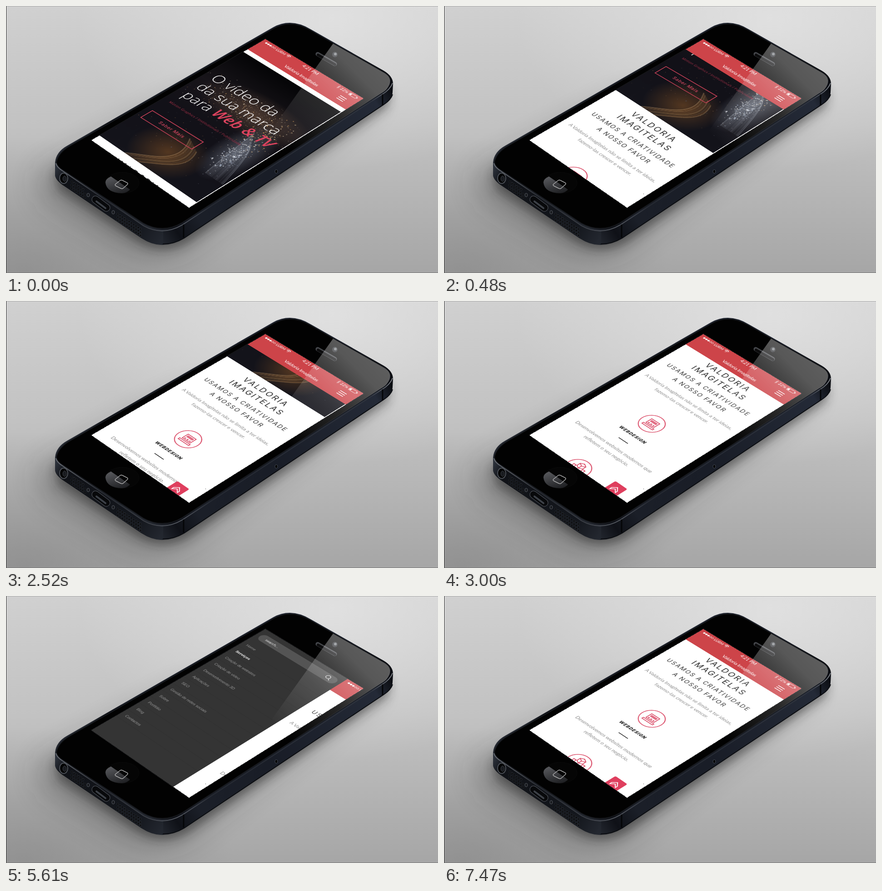
Animation of 951x589 px, one loop 9 s. Source, as an HTML page with a canvas:

```html
<!DOCTYPE html>
<html lang="pt">
<head>
<meta charset="utf-8">
<title>Mobile site mockup</title>
<style>
html, body { margin: 0; width: 100%; height: 100%; overflow: hidden; }
#stage { position: relative; width: 951px; height: 589px; overflow: hidden;
  background:
    radial-gradient(ellipse 560px 330px at 720px 30px, #e4e4e4cc, #e4e4e400),
    radial-gradient(ellipse 460px 300px at 40px 589px, #83838399, #83838300),
    linear-gradient(#d0d0d0, #c2c2c2 45%, #a6a6a6); }
#stage::after { content: ""; position: absolute; inset: 0; border-left: 1px solid #333; border-top: 1px solid #aaa; border-bottom: 1px solid #777; }
svg { position: absolute; left: 0; top: 0; }
#screen { position: absolute; left: 0; top: 0; width: 320px; height: 568px; overflow: hidden; transform-origin: 0 0; background: #343434; }
#screen * { position: absolute; white-space: nowrap; }
#screen b, #screen i { position: static; }
.row, .mid { line-height: 0; }
.mid { left: 0; width: 320px; text-align: center; }
#front, #page { left: 0; top: 0; width: 320px; height: 568px; background: #fff; }
#front { overflow: hidden; }
#page { height: 1120px; }
#hero { left: 0; top: 76px; width: 318px; height: 467px; }
#pitch { left: 0; top: 0; width: 320px; height: 0; transform-origin: 18px 0; transform: skewY(-2deg); }
.big { left: 21px; color: #fff; font: 300 42px/0 "Open Sans", sans-serif; }
.big b { color: #e0435f; font-weight: 600; }
#tags { left: 19px; top: 339px; color: #ab3148; font: 10px/0 "Open Sans", sans-serif; letter-spacing: .35px; }
#more { left: 15px; top: 391px; width: 161px; height: 35px; border: 2px solid #d0425a; color: #d94862; text-align: center; font: 500 13px/35px Inter, sans-serif; letter-spacing: 1px; }
.title { color: #2b2b2b; font: 400 23px/0 Inter, sans-serif; letter-spacing: 3.3px; }
.sub { color: #333; font: 400 17px/0 Inter, sans-serif; letter-spacing: 2.6px; }
.copy { color: #8c8c8c; font: 400 14px/0 Lato, sans-serif; }
.name { color: #222; font: italic 800 12px/0 Inter, sans-serif; letter-spacing: 1.2px; }
#rule { left: 145px; top: 918px; width: 30px; height: 2px; background: #333; }
#bar { left: 0; top: 0; width: 320px; height: 61px; background: #cd4449; color: #fff; }
#bar .row { font: 12px/0 Lato, sans-serif; top: 10px; }
#bar .title { top: 42px; color: #fff; font: 400 14px/0 Lato, sans-serif; letter-spacing: -.4px; }
#up { left: 250px; top: 536px; width: 38px; height: 38px; border-radius: 4px; background: #df3f5e; }
.item { left: 14px; color: #959595; font: 11px/0 "Liberation Sans", Arial, sans-serif; }
.item.on { color: #fff; font-weight: bold; }
.line { left: 0; width: 320px; height: 1px; background: #2f2f2f; }
#group, #rest { left: 0; width: 320px; overflow: hidden; }
#group { top: 132px; }
#rest { height: 150px; }
#search { left: 11px; top: 16px; width: 249px; height: 28px; border-radius: 14px; background: #545454; color: #eee; font: 11px/28px "Liberation Sans", Arial, sans-serif; }
#search span { left: 20px; }
</style>
</head>
<body>
<div id="stage">
<svg width="951" height="589" fill="none">
  <defs>
    <filter id="blur" x="-30%" y="-30%" width="160%" height="160%"><feGaussianBlur stdDeviation="11"/></filter>
    <filter id="haze" x="-30%" y="-30%" width="160%" height="160%"><feGaussianBlur stdDeviation="32"/></filter>
    <linearGradient id="side" gradientUnits="userSpaceOnUse" x1="340" y1="520" x2="850" y2="190">
      <stop stop-color="#23272f"/><stop offset=".07" stop-color="#0f1117"/><stop offset=".16" stop-color="#1b1f28"/><stop offset=".5" stop-color="#191d27"/><stop offset=".93" stop-color="#242a37"/><stop offset="1" stop-color="#0c0e13"/>
    </linearGradient>
    <linearGradient id="front-face" gradientUnits="userSpaceOnUse" x1="108" y1="360" x2="345" y2="510">
      <stop stop-color="#2d323b"/><stop offset=".1" stop-color="#101217"/><stop offset=".8" stop-color="#14171d"/><stop offset="1" stop-color="#23272f"/>
    </linearGradient>
    <linearGradient id="rim" gradientUnits="userSpaceOnUse" x1="108" y1="400" x2="850" y2="150">
      <stop stop-color="#7d8188"/><stop offset=".12" stop-color="#282b31"/><stop offset=".3" stop-color="#595d65"/><stop offset=".4" stop-color="#272b33"/><stop offset=".92" stop-color="#30353f"/><stop offset="1" stop-color="#92969c"/>
    </linearGradient>
    <linearGradient id="home" gradientUnits="userSpaceOnUse" x1="238" y1="376" x2="250" y2="414">
      <stop stop-color="#55565a"/><stop offset="1" stop-color="#202124"/>
    </linearGradient>
    <linearGradient id="shine" gradientUnits="userSpaceOnUse" x1="790" y1="110" x2="600" y2="300">
      <stop stop-color="#fff" stop-opacity=".36"/><stop offset=".15" stop-color="#fff" stop-opacity=".34"/><stop offset=".5" stop-color="#fff" stop-opacity=".15"/><stop offset="1" stop-color="#fff" stop-opacity="0"/>
    </linearGradient>
  </defs>
  <path d="M70 370L400 200 830 200 400 530Q330 570 260 535L80 425Z" fill="#222" opacity=".3" filter="url(#haze)"/>
  <path d="M108 365L620 60 845 190 840 222 396 525Q340 550 290 520L115 405Z" fill="#222" opacity=".5" filter="url(#blur)"/>
  <path d="M108 345Q110 322 135 308L588 47Q628 25 672 52L832 143Q852 155 852 172L851 190Q850 207 832 218L392 513Q345 541 298 512L128 397Q108 384 108 372Z" fill="url(#side)"/>
  <path d="M108 345L122 361 302 483Q325 496 346 494V527Q322 528 298 512L128 397Q108 384 108 372Z" fill="url(#front-face)"/>
  <path d="M345 525Q370 525 392 512L832 217Q848 206 851 195" stroke="#0b0d11" stroke-width="2"/>
  <path d="M112 340Q118 322 140 309L590 49Q628 28 670 53L830 145Q856 160 838 183 834 188 825 193L388 478Q345 503 302 479L122 360Q108 350 112 340Z" fill="#020202" stroke="#16181c" stroke-width="2"/>
  <path d="M110 347Q112 356 125 364L303 485Q345 508 388 483L828 195Q846 184 851 170" stroke="url(#rim)" stroke-width="1.800"/>
  <path d="M391 482V511M829 195V219" stroke="#050608" stroke-width="3"/>
  <ellipse cx="595" cy="365" rx="3" ry="4" fill="#030303" stroke="#444a54"/>
  <ellipse cx="127" cy="380" rx="9" ry="11.500" fill="#030303" stroke="#4c5057" stroke-width="2"/>
  <ellipse cx="129" cy="381" rx="4" ry="6" fill="#191b1f" stroke="#3c4047"/>
  <path d="M145 388l28 19M144 395l30 20M144 402l30 20M246 459l52 34M246 466l52 34M246 473l52 34" stroke="#3a3e45" stroke-width="4.500" stroke-dasharray="0 6" stroke-linecap="round"/>
  <path d="M145 388l28 19M144 395l30 20M144 402l30 20M246 459l52 34M246 466l52 34M246 473l52 34" stroke="#020202" stroke-width="3.400" stroke-dasharray="0 6" stroke-linecap="round"/>
  <path d="M197 427L221 445" stroke="#555961" stroke-width="17" stroke-linecap="round"/>
  <path d="M197 427L221 445" stroke="#08090b" stroke-width="15" stroke-linecap="round"/>
  <path d="M199 431L219 446" stroke="#3d4148" stroke-width="4" stroke-linecap="round"/>
  <g fill="#17191d" stroke="#555960"><ellipse cx="181" cy="417" rx="3" ry="4"/><ellipse cx="236" cy="455" rx="3" ry="4"/></g>
  <ellipse cx="256" cy="390" rx="37" ry="23" fill="#050505" stroke="#0b0b0b"/>
  <path d="M231 376Q218 382 219 390 222 412 255 413 267 412 273 405Z" fill="url(#home)"/>
  <path d="M251 385Q254 383 257 385L267 390Q269 392 267 394L258 402Q256 404 252 402L242 397Q239 395 241 393Z" stroke="#aaa" stroke-width="1.500"/>
  <path d="M686 106L724 128" stroke="#44464a" stroke-width="9" stroke-linecap="round"/>
  <path d="M687 108L724 129" stroke="#0c0c0d" stroke-width="6" stroke-linecap="round"/>
  <circle cx="724" cy="107" r="6" fill="#24262a"/><circle cx="725" cy="106" r="3" fill="#777b80"/>
  <path d="M571 72L788 204 403 446 187 296Z" fill="#111" stroke="#1a1b1d"/>
</svg>

<div id="screen">
  <div id="menu">
    <div id="search"><span>search...</span>
      <svg width="249" height="28" fill="none" stroke="#eee" stroke-width="1.500"><circle cx="223" cy="12" r="6"/><path d="M227.500 16.500l5 5"/></svg>
    </div>
    <div id="group"></div>
    <div id="rest"></div>
  </div>
  <div id="front">
    <div id="page">
      <canvas id="hero" width="640" height="938"></canvas>
      <div id="pitch">
        <div class="big" style="top:195px">O vídeo da</div>
        <div class="big" style="top:243px">da sua marca</div>
        <div class="big" style="top:290px">para <b><i>Web &amp; TV</i></b></div>
        <div id="tags">Motion Graphics / Institutionais / Publicidade</div>
        <div id="more">Saber Mais</div>
      </div>
      <div class="mid title" style="top:575px">VALDORIA</div>
      <div class="mid title" style="top:606px">IMAGITELAS</div>
      <div class="mid sub" style="top:643px">USAMOS A CRIATIVIDADE</div>
      <div class="mid sub" style="top:672px">A NOSSO FAVOR</div>
      <div class="mid copy" style="top:709px">A Valdoria Imagitelas não se limita a ter ideias,</div>
      <div class="mid copy" style="top:731px">fazemo-las crescer e vencer.</div>
      <div class="mid name" style="top:889px">WEBDESIGN</div>
      <div id="rule"></div>
      <div class="mid copy" style="top:950px">Desenvolvemos websites modernos que</div>
      <div class="mid copy" style="top:972px">refletem o seu negócio.</div>
      <svg width="320" height="1120" fill="none" stroke="#d8415e" stroke-width="2">
        <circle cx="161" cy="829" r="31"/><circle cx="161" cy="1061" r="31"/>
        <path d="M148 816h26v19h-26zM144 839h34v5h-34z"/>
        <path d="M151 819h20v7h-20z" fill="#d8415e" stroke="none" opacity=".75"/>
        <path d="M151 831h5m3 0h5m3 0h4" stroke-width="3"/>
        <path d="M161 1040l9 5v10l-9 5-9-5v-10zM152 1045l9 5 9-5M161 1050v10M143 1056v14h7v-14zM172 1056v14h7v-14z"/>
      </svg>
    </div>
    <div id="up"><svg width="38" height="38" fill="none" stroke="#fff" stroke-width="2"><path d="M10 21l9-9 9 9v6l-9-8-9 8z"/></svg></div>
    <div id="bar">
      <svg width="320" height="61" fill="none" stroke="#fff">
        <g fill="#fff"><circle cx="13" cy="10" r="2.500"/><circle cx="20" cy="10" r="2.500"/><circle cx="27" cy="10" r="2.500"/></g>
        <circle cx="34" cy="10" r="2.500"/><circle cx="41" cy="10" r="2.500"/>
        <path d="M80 8q6-6 12 0M82.500 10.500q3.500-3.500 7 0M85 13h2" stroke-width="1.700"/>
        <path d="M248 7l5 6-3 3V4l3 3-5 6" opacity=".7"/>
        <rect x="284.500" y="5.500" width="22" height="9" rx="2"/><path d="M308.500 8v4" stroke-width="2"/><path d="M286 7h5v6h-5z" fill="#fff" stroke="none"/>
        <path d="M275 31h20M275 37.500h20M275 44h20" stroke-width="2"/>
      </svg>
      <div class="row" style="left:47px;font-size:10.5px">LURM</div>
      <div class="row" style="left:135px;font-size:13px">4:21 PM</div>
      <div class="row" style="left:257px">22%</div>
      <div class="mid title">Valdoria Imagitelas</div>
    </div>
  </div>
</div>

<svg width="951" height="589"><path d="M720 83L830 146Q856 160 838 183 834 188 825 193L628 321 578 282Z" fill="url(#shine)"/></svg>
</div>

<script>
const $ = id => document.getElementById(id);

// Perspective transform that lays a w x h box onto four corners (clockwise from top left).
function project(w, h, [[x0, y0], [x1, y1], [x2, y2], [x3, y3]]) {
  const ax = x1 - x2, ay = y1 - y2, bx = x3 - x2, by = y3 - y2;
  const sx = x0 - x1 + x2 - x3, sy = y0 - y1 + y2 - y3;
  const det = ax * by - bx * ay;
  const g = (sx * by - bx * sy) / det, k = (ax * sy - sx * ay) / det;
  const m = [
    (x1 - x0 + g * x1) / w, (y1 - y0 + g * y1) / w, 0, g / w,
    (x3 - x0 + k * x3) / h, (y3 - y0 + k * y3) / h, 0, k / h,
    0, 0, 1, 0, x0, y0, 0, 1];
  return `matrix3d(${m.map(n => n.toFixed(8)).join()})`;
}
$('screen').style.transform = project(320, 568, [[571, 73], [787, 204], [403, 445], [188, 296]]);

// Menu rows
const ROW = 36;
function addRow(parent, text, y) {
  const row = document.createElement('div'), line = document.createElement('div');
  row.className = 'item';
  row.textContent = text;
  row.style.top = y + 'px';
  line.className = 'line';
  line.style.top = y + ROW / 2 - 1 + 'px';
  parent.append(row, line);
  return row;
}
addRow($('menu'), 'Home', 78);
const services = addRow($('menu'), 'Serviços', 78 + ROW);
const subItems = ['Criação de websites', 'Criação de video', 'Desenvolvimento 3D', 'Aplicações', 'SEO', 'Gestão de redes sociais'];
subItems.forEach((s, i) => addRow($('group'), s, 18 + ROW * i));
['Sobre', 'Portfólio', 'Blog', 'Contactos'].forEach((s, i) => addRow($('rest'), s, 18 + ROW * i));

// City at night
function drawHero() {
  const c = $('hero').getContext('2d');
  let seed = 7;
  const rnd = () => (seed = seed * 16807 % 2147483647) / 2147483647;
  const spread = () => rnd() + rnd() + rnd() - 1.5;
  const glow = (x, y, rx, ry, color) => {
    c.save();
    c.translate(x, y);
    c.scale(rx, ry);
    const g = c.createRadialGradient(0, 0, 0, 0, 0, 1);
    g.addColorStop(0, color);
    g.addColorStop(1, color.slice(0, 7) + '00');
    c.fillStyle = g;
    c.fillRect(-1, -1, 2, 2);
    c.restore();
  };
  const dots = (n, x, y, w, h, size, colors) => {
    for (let i = 0; i < n; i++) {
      c.fillStyle = colors[i % colors.length];
      c.globalAlpha = .25 + rnd() * .65;
      c.beginPath();
      c.arc(x + spread() * w, y + spread() * h, size * (.4 + rnd()), 0, 7);
      c.fill();
    }
    c.globalAlpha = 1;
  };
  c.scale(2, 2);
  const sky = c.createLinearGradient(0, 0, 0, 469);
  sky.addColorStop(0, '#050507');
  sky.addColorStop(.3, '#18151a');
  sky.addColorStop(.6, '#121118');
  sky.addColorStop(1, '#14141b');
  c.fillStyle = sky;
  c.fillRect(0, 0, 320, 469);
  glow(190, 155, 170, 75, '#7a5a4488');
  glow(262, 280, 62, 125, '#8a93a288');
  glow(150, 395, 100, 90, '#7d4f2699');
  dots(420, 170, 155, 140, 50, 1, ['#d3a066', '#8a7a70', '#f0dcb8']);
  dots(110, 258, 200, 45, 80, 1.3, ['#d59a55', '#e8c795']);
  dots(240, 262, 290, 26, 75, 1.4, ['#e8eef6', '#9aa7ba', '#c9c9c9']);
  dots(140, 160, 300, 170, 170, 1, ['#555563', '#6b5038']);
  for (let i = 0; i < 16; i++) {
    const d = i * 3;
    c.strokeStyle = i % 3 ? '#b97a3c' : '#ecc48a';
    c.globalAlpha = .12 + rnd() * .26;
    c.lineWidth = .8 + rnd() * 2.2;
    c.beginPath();
    c.moveTo(85 + d, 469);
    c.bezierCurveTo(130 + d, 430, 205 + d / 2, 410, 150 + d, 325 + d / 2);
    c.stroke();
    c.strokeStyle = '#d5dce8';
    c.globalAlpha *= .8;
    c.beginPath();
    c.moveTo(238 + d * .7, 205 + d);
    c.quadraticCurveTo(245 + d, 280, 262 + d * 1.2, 385);
    c.stroke();
  }
}
drawHero();

// Tracks of [time, value]; eased between neighbours, flat outside.
const tracks = {
  scroll: [[30, 0], [480, 248], [900, 252], [1770, 240], [1900, 240], [2900, 494]],
  slide: [[3180, 0], [3720, 270], [6990, 270], [7470, 0]],
  search: [[3860, 0], [4200, 1]],
  expand: [[4680, 0], [4860, 1], [6180, 1], [6450, 0]]
};
function at(track, t) {
  const i = track.findIndex(p => p[0] > t);
  if (i < 0) return track[track.length - 1][1];
  if (!i) return track[0][1];
  const [t0, a] = track[i - 1], [t1, b] = track[i];
  const p = (t - t0) / (t1 - t0);
  return a + (b - a) * p * p * (3 - 2 * p);
}

const start = performance.now();
function draw(now) {
  const t = Math.max(0, now - start) % 9000;
  const scroll = at(tracks.scroll, t), open = at(tracks.expand, t) * ROW * subItems.length;
  $('page').style.top = -scroll + 'px';
  $('up').style.opacity = Math.min(1, Math.max(0, (scroll - 300) / 60));
  $('front').style.left = at(tracks.slide, t) + 'px';
  $('search').style.opacity = at(tracks.search, t);
  $('group').style.height = open + 'px';
  $('rest').style.top = 132 + open + 'px';
  services.classList.toggle('on', t >= 4380 && t < 6240);
  requestAnimationFrame(draw);
}
draw(start);
</script>
</body>
</html>
```
